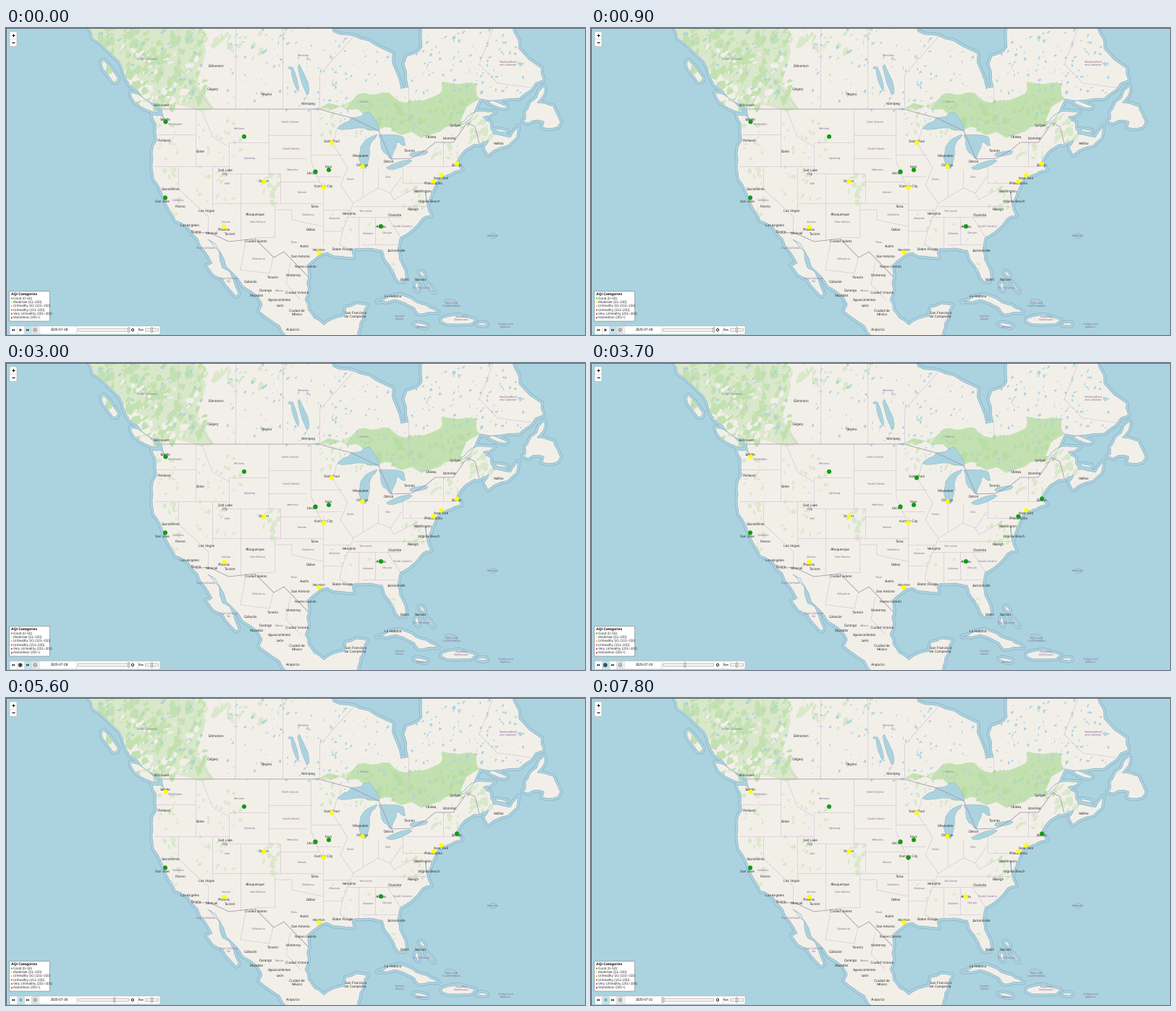
A matplotlib script that plays this animation: 800 by 424 pixels, repeating every 8 s.

```python
import numpy as np
import matplotlib.pyplot as plt
from matplotlib.animation import FuncAnimation
from matplotlib.collections import LineCollection, PolyCollection
from matplotlib.patches import Circle, FancyBboxPatch, Rectangle
from matplotlib.path import Path

W, H, PX = 800, 424, 0.72
WATER, LAND, COAST = "#aad3df", "#f2efe9", "#8fb3c3"
WOOD, DEEP, PALE = "#c3e1b0", "#b9dca5", "#d9e8ca"
BORDER, STATE, PURPLE, DARK = "#a295ab", "#d0c0d2", "#8c749c", "#333333"
GREEN, YELLOW = "#109a14", "#ffff00"
plt.rcParams.update({"font.family": "Liberation Sans", "text.hinting": "none"})

rng = np.random.default_rng(7)
fig = plt.figure(figsize=(W / 100, H / 100), dpi=100, facecolor=WATER)
ax = fig.add_axes([0, 0, 1, 1])
ax.set(xlim=(0, W), ylim=(H, 0))
ax.axis("off")


def rough(points, amp=0.13, depth=2):
    """Close an outline and shift the middle of each segment sideways."""
    p = np.reshape(points, (-1, 2)).astype(float)
    p = np.vstack([p, p[:1]])
    for _ in range(depth):
        d = np.diff(p, axis=0)
        shift = d[:, ::-1] * [1, -1] * rng.normal(0, amp, (len(d), 1))
        out = np.empty((2 * len(p) - 1, 2))
        out[::2], out[1::2] = p, (p[:-1] + p[1:]) / 2 + shift
        p = out
    return p


def oval(x, y, w, h, degrees):
    """An irregular island, lake or patch."""
    a, turn = np.linspace(0, 2 * np.pi, 10)[:-1], np.radians(degrees)
    r = rng.uniform(0.75, 1.2, 9) / 2
    u, v = w * r * np.cos(a), h * r * np.sin(a)
    return np.c_[x + u * np.cos(turn) - v * np.sin(turn),
                 y + u * np.sin(turn) + v * np.cos(turn)]


def polys(shapes, color, z, edge="none", width=0, clip=True):
    c = PolyCollection(shapes, facecolor=color, edgecolor=edge,
                       linewidth=width * PX, zorder=z, joinstyle="round")
    ax.add_collection(c, autolim=False)
    if clip:
        c.set_clip_path(land_path, ax.transData)


def patches(n, x0, y0, x1, y1, size, color, z=2):
    shapes = []
    for _ in range(n):
        w = size * rng.uniform(0.6, 2.4)
        shapes.append(oval(rng.uniform(x0, x1), rng.uniform(y0, y1), w,
                           w * rng.uniform(0.3, 0.8), rng.normal(125, 30)))
    polys(shapes, color, z)


def lines(paths, color, width, z=4):
    ax.add_collection(LineCollection(
        [np.reshape(p, (-1, 2)) for p in paths], colors=color,
        linewidths=width * PX, zorder=z), autolim=False)


def text(x, y, s, size=4.7, color=DARK, z=6, **kw):
    kw = {"ha": "center", "va": "center", "linespacing": 1.0, **kw}
    return ax.text(x, y, s, fontsize=size * PX, color=color, zorder=z, **kw)


# Coastlines
west = [110, -15, 120, 14, 157, 46, 170, 78, 214, 110, 220, 129, 216, 122, 202, 120,
        207, 145, 203, 182, 204, 208, 223, 246, 234, 266, 251, 273, 265, 291,
        285, 325, 277, 328, 300, 348, 318, 370, 321, 366, 299, 331, 279, 292,
        295, 308, 321, 346, 354, 381, 350, 391, 378, 411, 411, 432]
gulf = [483, 432, 489, 407, 499, 383, 470, 386, 468, 398, 439, 410, 426, 401,
        413, 375, 418, 344, 416, 328, 444, 310, 480, 317, 477, 306, 502, 304,
        520, 307, 530, 327, 543, 350]
east = [550, 350, 551, 335, 541, 305, 545, 289, 568, 272, 587, 259, 580, 227,
        584, 241, 590, 224, 599, 207, 615, 201, 630, 195, 622, 188, 629, 174,
        654, 161, 671, 150, 661, 164, 666, 175, 701, 155, 708, 136, 697, 151,
        673, 147, 669, 131, 659, 123, 675, 116]
north = [643, 118, 621, 137, 655, 98, 709, 97, 742, 72, 740, 56, 709, 29, 693, -15,
         575, -15, 575, 26, 554, 39, 556, 82, 546, 84, 534, 35, 489, 15, 452, 5, 440, -15]
cuba = [513, 378, 544, 368, 575, 382, 597, 393, 571, 395, 562, 385, 538, 375]
newfoundland = [714, 129, 721, 112, 744, 80, 734, 103, 756, 108, 766, 130, 741, 137, 743, 129]
lands = [rough(west + gulf + east + north, 0.08), rough(cuba, 0.06), rough(newfoundland)]
lands += [oval(*o) for o in (
    (191, 104, 46, 12, 33), (143, 60, 32, 11, 55), (680, 106, 30, 6, 20),
    (684, 142, 17, 4, 10), (621, 403, 48, 14, 0), (658, 409, 14, 4, 0),
    (573, 410, 18, 5, 15), (568, 357, 11, 5, 75), (575, 340, 9, 4, 50),
    (585, 357, 18, 2, 50), (615, 379, 10, 2, 10), (673, 287, 2, 1, 0))]
land_path = Path.make_compound_path(*[Path(p) for p in lands])
polys(lands, "none", 0.1, "#8fadcb", 7.2, clip=False)
polys(lands, WATER, 0.2, WATER, 5.8, clip=False)
polys(lands, LAND, 1, COAST, 0.7, clip=False)

# Woodland and lakes
coast_range = [112, -5, 262, -5, 266, 66, 288, 112, 214, 112, 160, 55]
shield = [487, 91, 520, 89, 553, 103, 600, 90, 602, 74, 650, 77, 655, 98, 628, 128,
          600, 143, 546, 148, 516, 140, 486, 112, 433, 111]
polys([rough(coast_range)], PALE, 1.5)
polys([rough(shield)], WOOD, 1.5)
patches(190, 130, -5, 275, 110, 7, WOOD)
patches(45, 150, 20, 270, 105, 5, LAND)
patches(55, 255, -5, 395, 35, 6, PALE)
patches(50, 490, 95, 640, 142, 5, DEEP)
patches(25, 425, 105, 500, 150, 4, PALE)
patches(36, 207, 118, 240, 262, 4, PALE)
patches(50, 262, 128, 325, 240, 3, PALE)
patches(16, 345, 202, 378, 242, 5, PALE)
patches(14, 582, 158, 626, 184, 4, PALE)
patches(24, 545, 212, 576, 252, 4, PALE)
patches(28, 450, 250, 548, 345, 3, PALE)
patches(24, 640, 115, 670, 158, 5, PALE)
patches(80, 120, -5, 270, 100, 2.5, WATER, 3)
patches(170, 300, -5, 530, 115, 2.2, WATER, 3)
patches(130, 560, -5, 715, 95, 2.4, WATER, 3)
patches(100, 430, 95, 640, 155, 1.5, WATER, 3)
superior = [458, 139, 477, 124, 502, 116, 516, 142, 485, 138]
michigan = [491, 194, 490, 164, 513, 147, 502, 167, 497, 194]
huron = [515, 148, 548, 150, 552, 162, 540, 158, 533, 181, 522, 172]
lakes = [rough(p, 0.08) for p in (superior, michigan, huron)]
lakes += [oval(*o) for o in ((543, 189, 36, 8, -17), (568, 174, 27, 7, -12),
                             (412, 73, 46, 9, 70), (399, 70, 30, 6, 75))]
polys(lakes, WATER, 3.2, COAST, 0.5)

# Borders: straight ones as y, x0, x1 or x, y0, y1
nations = [[214, 112, 433, 112, 450, 117, 477, 124, 515, 142, 532, 181, 560, 180,
            581, 168, 593, 158, 618, 158, 637, 131, 648, 136, 654, 160],
           [261, 284, 280, 282, 308, 295, 344, 291, 370, 317, 384, 309, 418, 344]]
across = [(147, 207, 262), (191, 205, 308), (158, 308, 363), (201, 308, 379),
          (148, 363, 422), (180, 363, 415), (212, 379, 432), (242, 285, 437),
          (251, 437, 472), (280, 438, 465), (205, 428, 462), (175, 422, 464),
          (214, 548, 585), (191, 553, 620), (246, 480, 584), (261, 471, 545),
          (299, 492, 540), (289, 343, 371)]
down = [(262, 112, 191), (308, 158, 201), (363, 112, 201), (379, 201, 242),
        (324, 201, 295), (285, 191, 250), (238, 191, 222), (371, 242, 289),
        (438, 212, 300), (421, 112, 185), (493, 194, 232), (514, 195, 221),
        (487, 261, 305), (510, 261, 299), (548, 190, 214), (604, 158, 191),
        (317, 0, 112), (382, 0, 112), (433, 65, 112), (556, 82, 130)]
bent = [[308, 164, 285, 150, 270, 112], [238, 222, 280, 261, 279, 282],
        [422, 185, 428, 201, 437, 220], [371, 251, 395, 251, 395, 265, 438, 274],
        [457, 139, 452, 161, 472, 193, 462, 217, 480, 242, 465, 280, 461, 299, 476, 306],
        [480, 242, 514, 221, 531, 228, 547, 205], [527, 261, 545, 289],
        [531, 228, 536, 237, 569, 219], [433, 65, 481, 11], [285, 112, 238, 52, 238, 0],
        [556, 130, 595, 153], [731, 83, 679, 76, 654, 50, 673, 0],
        [331, 295, 324, 334, 364, 339, 369, 317], [393, 323, 387, 354, 407, 375]]
lines(nations, BORDER, 0.8)
lines([[a, y, b, y] for y, a, b in across], STATE, 0.6)
lines([[x, a, x, b] for x, a, b in down], STATE, 0.6)
lines(bent, STATE, 0.6)

# Place names
us_cities = {
    "Portland": (218, 156), "Boise": (269, 171), "Salt Lake\nCity": (303, 199),
    "Sacramento": (228, 223), "Fresno": (241, 247), "Las Vegas": (277, 253),
    "Los Angeles": (254, 273), "Tucson": (310, 285), "Albuquerque": (344, 258),
    "Dallas": (421, 279), "Austin": (413, 302), "San Antonio": (407, 316),
    "Tulsa": (427, 247), "Milwaukee": (490, 177), "Detroit": (529, 185),
    "Washington": (576, 226), "Virginia Beach": (584, 240), "Raleigh": (563, 251),
    "Charlotte": (537, 259), "Memphis": (474, 257), "Jacksonville": (540, 308),
    "Miami": (551, 348), "Baton Rouge": (465, 306)}
other_cities = {
    "Edmonton": (290, 53), "Calgary": (286, 85), "Regina": (360, 92),
    "Winnipeg": (418, 105), "Vancouver": (215, 107), "Toronto": (558, 170),
    "Ottawa": (587, 151), "Montréal": (613, 153), "Québec": (621, 135),
    "Halifax": (681, 160), "Tijuana": (263, 282), "Mexicali": (284, 284),
    "Ciudad Juárez": (345, 295), "Nuevo Laredo": (414, 330), "Monterrey": (397, 342),
    "Torreón": (369, 345), "Culiacán": (338, 351), "Durango": (359, 363),
    "Mazatlán": (346, 370), "Ciudad Victoria": (402, 366),
    "Aguascalientes": (378, 376), "León": (379, 384),
    "Ciudad de\nMéxico": (402, 393), "Acapulco": (397, 417),
    "San Francisco\nde Campeche": (483, 396), "La Habana": (535, 371),
    "Nassau": (573, 348)}
regions = {
    "British Columbia": (195, 43), "Manitoba": (411, 38), "Ontario": (495, 102),
    "Newfoundland\nand Labrador": (694, 49), "Washington": (234, 133),
    "Montana": (322, 139), "Wyoming": (337, 180), "North Dakota": (392, 130),
    "South Dakota": (394, 167), "Nebraska": (396, 196), "Kansas": (409, 227),
    "Oklahoma": (418, 258), "Texas": (398, 296), "New Mexico": (348, 268),
    "Arizona": (305, 268), "Utah": (306, 215), "California": (238, 238),
    "Arkansas": (454, 263), "Alabama": (501, 284), "Georgia": (527, 283),
    "South Carolina": (548, 274), "Tennessee": (497, 253), "Illinois": (476, 209),
    "Ohio": (528, 206), "Chihuahua": (349, 319), "Baja California": (276, 304),
    "Baja California\nSur": (308, 348), "México": (378, 364), "Bermuda": (673, 287),
    "The Bahamas": (574, 359), "Turks and\nCaicos Islands": (616, 382),
    "Cayman\nIslands": (544, 400), "Jamaica": (574, 413),
    "República\nDominicana": (629, 401), "Antigua and\nBarbuda": (690, 411)}
for group, size, color in ((us_cities, 4.7, DARK), (other_cities, 4.7, DARK),
                           (regions, 3.9, PURPLE)):
    for name, (x, y) in group.items():
        text(x, y, name, size, color)

# Air quality stations: name, x, y, label offset, days with good air
ALWAYS = "12345678"
stations = [("Seattle", 220.5, 129.5, -3, "78"), ("", 329, 150, 0, ALWAYS),
            ("San Jose", 220, 234.5, 5, ALWAYS), ("Phoenix", 301.5, 275, 4, ""),
            ("Denver", 356.5, 212, 0, ""), ("Saint Paul", 450, 158.5, -2, "234"),
            ("Lincoln", 427.5, 198.5, 2, ALWAYS), ("Iowa", 446, 196, -4, "1245678"),
            ("Kansas City", 438.5, 220.5, -2, "12"), ("Houston", 432.5, 310, -3, ""),
            ("Chicago", 492.5, 191, -1, ""), ("Atlanta", 518, 274, 1, "345678"),
            ("Philadelphia", 590.5, 212, 3, "34"), ("New York", 601.5, 203.5, 4, ""),
            ("Boston", 623, 187.5, 2, "123456")]
for name, x, y, dy, _ in stations:
    text(x - (4 if name in ("San Jose", "Lincoln") else 0), y + dy, name)
dots = ax.scatter([s[1] for s in stations], [s[2] for s in stations],
                  s=(5.8 * PX) ** 2, linewidths=0.3, zorder=8)


def panel(x, y, w, h, color="white", edge="#b5b5b5", z=9, radius=1):
    box = FancyBboxPatch((x, y), w, h, boxstyle=f"round,pad=0,rounding_size={radius}",
                         facecolor=color, edgecolor=edge, linewidth=0.7 * PX, zorder=z)
    return ax.add_patch(box)


def arrow(x, w=2.2, h=1.8):
    """Triangle with its upright side at x and its tip at x + w."""
    return ax.fill([x, x, x + w], [417.1 - h, 417.1 + h, 417.1], color=DARK, lw=0, zorder=11)[0]


def ring(x, r, color):
    ax.add_patch(Circle((x, 417), r, fill=False, ec=color, lw=0.7, zorder=11))


# Zoom control and legend
panel(5, 5, 10, 20.5)
lines([[5, 15.2, 15, 15.2]], "#cccccc", 0.6, 10)
lines([[8, y, 12.2, y] for y in (10, 20.3)] + [[10.1, 7.9, 10.1, 12.1]], "black", 1.1, 11)
panel(4.5, 363.5, 56, 41.5, edge="#8a8a8a")
text(7, 368, "AQI Categories", 5, "black", 11, ha="left", weight="bold")
levels = {"Good (0–50)": "green", "Moderate (51–100)": "#e8e800",
          "Unhealthy SG (101–150)": "orange", "Unhealthy (151–200)": "red",
          "Very Unhealthy (201–300)": "purple", "Hazardous (301+)": "maroon"}
for i, (label, color) in enumerate(levels.items()):
    y = 373.4 + 5.35 * i
    ax.add_patch(Circle((8, y), 0.9, color=color, lw=0, zorder=11))
    text(10.2, y, label, 4.6, DARK, 11, ha="left")

# Time control
panel(5, 411.5, 208, 11.5)
buttons = [ax.add_patch(Rectangle((5.5 + 10 * i, 412), 9.5, 10.5, lw=0, zorder=9.5))
           for i in range(4)]
lines([[x, 411.5, x, 423] for x in (15.2, 25.2, 35.2, 46, 97, 182)], "#c4c4c4", 0.6, 10)
for tip in (10, 12.2):
    arrow(tip, -2.2)
    arrow(tip + 18)
play = arrow(18.6, 3.6, 2.2)
pause = [ax.add_patch(Rectangle((x, 415.2), 1, 3.8, color="#4a7f9c", lw=0, zorder=11))
         for x in (18.6, 20.6)]
ring(40.3, 1.8, "#777777")
ring(175, 1.6, "#222222")
date = text(74, 416.8, "", color="black", z=11)
text(187, 416.8, "5fps", 4.2, "black", 11)
for x, w in ((99.5, 70), (192.5, 18)):
    panel(x, 415, w, 4, "#f4f4f4", "#a5a5a5", 10)
handle, _ = [panel(x, 413.8, 2, 6.4, "white", "#777777", 11, 0.6) for x in (99, 200.5)]
cursor = ax.add_patch(Circle((0, 0), 3, fc="#26333a", ec="none", alpha=0.75, zorder=12))
lines([[0, 0.4, W, 0.4], [0.4, 0, 0.4, H]], "#59636a", 1, 13)

STEP, FRAMES, START = 100, 80, 3200


def update(i):
    t = i * STEP
    playing = t >= START
    day = (t - 3000) // 200 % 8 if playing else 7
    dots.set_color([GREEN if str(day + 1) in s[-1] else YELLOW for s in stations])
    date.set_text(f"2025-07-{21 + day}")
    handle.set_x(98.8 + 10 * day)
    play.set_visible(not playing)
    for bar in pause:
        bar.set_visible(playing)
    hover = 1 if playing else 2
    for k, b in enumerate(buttons):
        b.set_facecolor("#c3e2ee" if k == hover else "#e0e2e3" if k == 3 else "white")
    glide = np.clip((t - 2200) / 300, 0, 1)
    cursor.center = 28 - 8.3 * glide, 416.3 + 0.9 * glide
    cursor.set_visible(1300 <= t < 5200)
    return dots, date, handle, cursor


anim = FuncAnimation(fig, update, frames=FRAMES, interval=STEP, repeat=True,
                     repeat_delay=0, blit=False)
plt.show()
```
